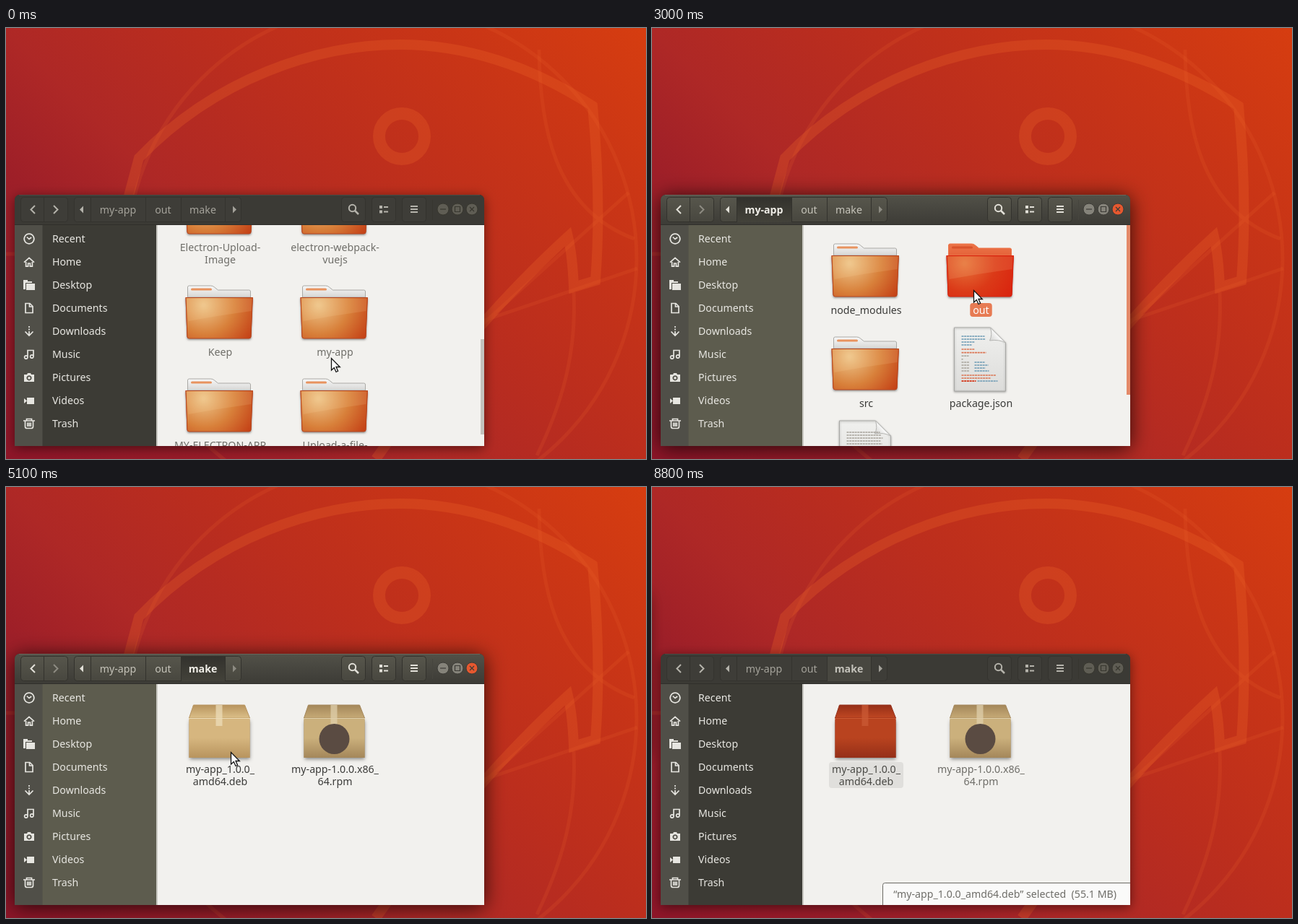
An HTML page with a canvas for the animation above (9.3 s loop, 886 px wide and 597 px high).

```html
<!DOCTYPE html>
<html lang="en">
<head>
<meta charset="utf-8">
<title>File manager</title>
<style>
html, body { margin: 0; height: 100%; overflow: hidden; background: #b02a26 }
canvas { display: block; width: 886px; height: 597px }
</style>
</head>
<body>
<canvas id="stage" width="886" height="597"></canvas>
<script>
const c = document.getElementById('stage').getContext('2d');
const LOOP = 9300, FONT = '14.2px "Noto Sans", "Open Sans", sans-serif';

// ---------- timeline ----------
const within = (t, a, b) => t >= a && t < b;
const DIR_START = [0, 1700, 3200, 4700];
const HOVER = [[200, 1700, 'my-app'], [1700, 2100, 'package.json'], [2200, 3200, 'out'],
  [3300, 3700, 'my-app-linux-x64'], [4100, 4700, 'make'], [6100, 7600, 'deb']];
const SELECT = [[1400, 1700, 'my-app'], [3000, 3200, 'out'], [4400, 4700, 'make'], [6200, LOOP, 'deb']];
const STATUS = [[1600, 1700, '“my-app” selected  (containing 5 items)'],
  [3100, 3200, '“out” selected  (containing 2 items)'],
  [4500, 4700, '“make” selected  (containing 2 items)'],
  [6500, LOOP, '“my-app_1.0.0_amd64.deb” selected  (55.1 MB)']];
const PATH = [[0, 450, 457], [500, 487, 445], [600, 487, 445], [800, 457, 403], [900, 468, 420],
  [2000, 468, 420], [2100, 463, 402], [2200, 478, 411], [2300, 478, 411], [2400, 449, 365],
  [2500, 449, 365], [2700, 445, 363], [3600, 445, 363], [3700, 410, 378], [3800, 410, 378],
  [4200, 298, 363], [5000, 298, 363], [5700, 392, 393], [6000, 392, 393], [6100, 309, 372],
  [7500, 309, 372], [7900, 323, 134], [8000, 323, 134], [8200, 245, 65], [8300, 221, 92],
  [8400, 221, 92], [8800, 60, -30], [LOOP, 60, -30]];
const active = (list, t) => (list.find(e => within(t, e[0], e[1])) || [])[2];

function pointer(t) {
  const i = PATH.findIndex(p => p[0] > t), [t0, x0, y0] = PATH[i - 1], [t1, x1, y1] = PATH[i];
  const k = (t - t0) / (t1 - t0);
  return [Math.round(x0 + (x1 - x0) * k), Math.round(y0 + (y1 - y0) * k)];
}

// ---------- helpers ----------
function fade(x0, y0, x1, y1, ...stops) {
  const g = c.createLinearGradient(x0, y0, x1, y1);
  stops.forEach((s, i) => Array.isArray(s) ? g.addColorStop(s[0], s[1]) : g.addColorStop(i / (stops.length - 1), s));
  return g;
}
function rect(x, y, w, h, fill) { c.fillStyle = fill; c.fillRect(x, y, w, h); }
function box(x, y, w, h, r, fill, line) {
  c.beginPath();
  c.roundRect(x, y, w, h, r);
  if (fill) { c.fillStyle = fill; c.fill(); }
  if (line) { c.strokeStyle = line; c.lineWidth = 1; c.stroke(); }
}
function disc(x, y, r, fill, line, width = 1) {
  c.beginPath();
  c.arc(x, y, r, 0, 7);
  if (fill) { c.fillStyle = fill; c.fill(); }
  if (line) { c.strokeStyle = line; c.lineWidth = width; c.stroke(); }
}
function shape(d, fill, line, width = 1) {
  const p = new Path2D(d);
  if (fill) { c.fillStyle = fill; c.fill(p, 'evenodd'); }
  if (line) { c.strokeStyle = line; c.lineWidth = width; c.stroke(p); }
}
function text(s, x, y, color, align = 'left', bold = '') {
  c.font = bold + FONT;
  c.textAlign = align;
  c.fillStyle = color;
  c.fillText(s, x, y + 5);
}
function at(x, y, draw) { c.save(); c.translate(x, y); draw(); c.restore(); }

// ---------- desktop ----------
function wallpaper() {
  rect(0, 0, 886, 597, fade(0, 597, 741.5, -144.5, [0, '#8d1528'], [.27, '#9e1f28'], [.4, '#ae2826'],
    [.6, '#bc2e1d'], [.81, '#c93516'], [1, '#d63d10']));
  const thin = 'rgba(235,100,45,.16)', thick = 'rgba(235,100,40,.28)';
  disc(520, 320, 353, null, thin, 5);
  shape('M738 30C739 130 756 250 870 292M660 410L862 228M662 405L874 333M786 366C790 450 770 520 735 592M0 313H14',
    null, thin, 5);
  disc(548, 150, 31.5, null, thick, 17);
  shape('M160 270L184 180C290 70 430 23 545 23C640 23 730 55 812 108C820 190 822 270 816 350L786 359C785 335 783 310 778 289C700 360 600 470 512 597',
    null, thick, 14);
}

// ---------- item icons ----------
const FOLDER = {
  normal: ['#ecc287', '#d8803a', '#c23a12', '#fafafa', '#d4d4d2', '#e8935f'],
  hover: ['#fff0ae', '#f8a860', '#e0462a', '#ffffff', '#fafafa', '#f6c08c'],
  both: ['#e57038', '#db3a18', '#d9210d', '#ec7448', '#e4633a', '#d9532c'],
};
const BOX = {
  normal: ['#dbbf88', '#d6b67f', '#b8945e', '#ecdcb8'],
  hover: ['#fce4a6', '#fadfa8', '#e9c78e', '#fff4d2'],
  both: ['#e05a2b', '#e25b2c', '#d34e22', '#e8754a'],
  selected: ['#c04722', '#b9431f', '#952f18', '#cb5a34'],
  rpm: ['#c6aa76', '#cbb07c', '#a4875a', '#dfcfab'],
};
// Icons are drawn around x = 0 with y = 0 at the folder's top edge.
function folder(state) {
  const [a, b, d, back, edge, strip] = FOLDER[state] || FOLDER.both;
  c.save();
  c.shadowColor = 'rgba(0,0,0,.4)'; c.shadowBlur = 3; c.shadowOffsetY = 2;
  shape('M-47 17H46L44 71Q44 74 41 74H-42Q-45 74-45 71Z', d);
  c.restore();
  shape('M-44 17V3Q-44 1-42 1H-12Q-9 1-7 3L-2 7H41Q43 7 43 9V17Z', fade(0, 0, 0, 18, back, edge),
    state == 'normal' ? '#aaa9a5' : back);
  c.lineCap = 'round';
  shape('M-38 6H-12', null, strip, 3);
  c.lineCap = 'butt';
  const g = c.createRadialGradient(-22, 28, 2, -18, 26, 80);
  [a, b, d].forEach((s, i) => g.addColorStop([0, .5, 1][i], s));
  shape('M-46.5 17.5H46L43.5 71Q43.5 74 41 74H-42Q-44.5 74-44.5 71Z', g, state == 'normal' ? '#b8471f' : d);
  shape('M-45 18.5H45L44 36Q0 42-43 50Z', 'rgba(255,225,170,.13)');
}
function carton(state) {
  const [top, front, low, tape] = BOX[state];
  c.save();
  c.shadowColor = 'rgba(0,0,0,.45)'; c.shadowBlur = 5; c.shadowOffsetY = 2;
  rect(-42, 24, 84, 53, low);
  c.restore();
  shape('M-36 4H35L42 22H-42Z', fade(0, 4, 0, 22, low, top), low);
  rect(-42, 22, 84, 55, fade(0, 22, 0, 77, front, front, low));
  rect(-42, 22, 84, 1, tape);
  c.globalAlpha = .75;
  rect(-5, 4, 9, 29, tape);
  c.globalAlpha = 1;
  if (state == 'rpm') disc(0, 51, 21, '#5a4b42');
}
function page(state, json) {
  c.save();
  c.shadowColor = 'rgba(0,0,0,.3)'; c.shadowBlur = 3; c.shadowOffsetY = 1;
  const paper = state == 'hover' ? ['#ffffff', '#f6f6f5'] : ['#f0f0ee', '#dcdcda'];
  shape('M-36-12H14L35 9V76H-36Z', fade(0, -12, 0, 76, ...paper), '#a9a9a6');
  c.restore();
  shape('M14-12Q17-2 13 6Q26 4 35 9Z', fade(14, 8, 26, -2, '#d0d0ce', '#ffffff'), '#b5b5b2');
  c.setLineDash([3, .7]);
  const blue = '#6c9ab4', red = '#dc7553', grey = '#a8a49c';
  if (json) {
    [32, 33, 18, 14].forEach((w, i) => shape(`M-26 ${i * 4}h${w}`, null, blue, 1.6));
    [18, 34, 10, 2].forEach((w, i) => shape(`M-26 ${18 + i * 4.6}h${w}`, null, i < 2 ? red : grey, 1.6));
    for (let i = 0; i < 4; i++) {
      shape(`M-26 ${36 + i * 4}h11`, null, grey, 1.6);
      shape(`M-8 ${36 + i * 4}h${14 + i * 5 % 9}`, null, blue, 1.6);
    }
    shape('M-26 54h48M-26 58h40', null, red, 1.6);
    shape('M-26 62h20', null, '#d4472c', 1.8);
    shape('M-4 62h28', null, blue, 1.6);
  } else {
    for (let i = 0; i < 14; i++) shape(`M-26 ${4 + i * 4}h${46 + i * 7 % 5}`, null, grey, 1.3);
  }
  c.setLineDash([]);
}

// ---------- folder contents: [key, kind, column, top, label lines] ----------
const DIRS = [
  [['up', 'folder', 0, 211, 'Electron-Upload-', 'Image'], ['vue', 'folder', 1, 211, 'electron-webpack-', 'vuejs'],
   ['Keep', 'folder', 0, 356, 'Keep'], ['my-app', 'folder', 1, 356, 'my-app'],
   ['caps', 'folder', 0, 485, 'MY-ELECTRON-APP'], ['file', 'folder', 1, 485, 'Upload-a-file-']],
  [['nm', 'folder', 0, 298, 'node_modules'], ['out', 'folder', 1, 298, 'out'], ['src', 'folder', 0, 427, 'src'],
   ['package.json', 'json', 1, 427, 'package.json'], ['lock', 'page', 0, 556, 'package-lock.json']],
  [['make', 'folder', 0, 298, 'make'], ['my-app-linux-x64', 'folder', 1, 298, 'my-app-linux-x64']],
  [['deb', 'carton', 0, 298, 'my-app_1.0.0_', 'amd64.deb'], ['rpm', 'carton', 1, 298, 'my-app-1.0.0.x86_', '64.rpm']],
];
function item([key, kind, col, top, ...lines], t, focus) {
  const x = 296 + col * 159, hover = active(HOVER, t) == key, sel = active(SELECT, t) == key;
  const state = sel ? (hover ? 'both' : 'selected') : hover ? 'hover' : 'normal';
  at(x - .5, top, () => {
    if (kind == 'folder') folder(state);
    else if (kind == 'carton') carton(key == 'rpm' ? 'rpm' : state);
    else page(state, kind == 'json');
  });
  if (sel) {
    c.font = FONT;
    const w = Math.max(...lines.map(s => c.measureText(s).width)) + 8;
    box(x + .5 - w / 2, top + 83, w, 2 + lines.length * 17, 4, focus ? '#e77b53' : '#e0dfdc');
  }
  const color = sel ? (focus ? '#fff' : '#4a4a46') : focus ? '#3b3b39' : '#6f6e69';
  lines.forEach((s, i) => text(s, x + .5, top + 93 + i * 17, color, 'center'));
}

// ---------- window ----------
const PLACES = [
  ['Recent', '', 'M8 1.2a6.8 6.8 0 1 0 .01 0M4.8 5.5L8 8.5l3.2-2.5'],
  ['Home', '', 'M1 8.7L8 2.4l7 6.3M3.6 8v6.2h3V10h2.8v4.2h3V8'],
  ['Desktop', 'M0 1h6v2h6v2H3v9H0zM4 6h12v9H4z', ''],
  ['Documents', '', 'M3 1.5h6l4 4V14.500H3zM8.500 1.500v4.500H13'],
  ['Downloads', '', 'M8 1v2M8 4.500v2M8 8v5M2.500 8.500L8 14l5.500-5.500'],
  ['Music', '', 'M6 12V2.500h8V11M6 12a2.200 2.200 0 1 1-4.400 0a2.200 2.200 0 1 1 4.400 0M14 11a2.200 2.200 0 1 1-4.400 0a2.200 2.200 0 1 1 4.400 0'],
  ['Pictures', 'M1 4h4l1-2h4l1 2h4v10H1zM8 5.200a3.600 3.600 0 1 0 .01 0zM8 7a1.800 1.800 0 1 0 .01 0z', ''],
  ['Videos', 'M5 4h10v9H5zM1 5l4 3.500-4 3.500z', ''],
  ['Trash', '', 'M0 4h16M4.500 4V1.500h7V4M2.500 4v8q0 2.500 2.500 2.500h6q2.500 0 2.500-2.500V4M5.800 6.500v5.500M8 6.500v5.500M10.200 6.500v5.500'],
];
function sidebar(focus) {
  rect(12, 273, 196, 306, focus ? '#5d5c4e' : '#3c3b35');
  rect(12, 273, 38, 306, '#504f48');
  rect(50, 273, 1, 306, focus ? '#55544a' : '#45443e');
  rect(208, 273, 2, 306, '#c9c8c2');
  PLACES.forEach(([name, solid, lines], i) => {
    const y = 292 + 32 * i;
    at(24, y - 8, () => shape(solid, '#e6e5e0'));
    at(24, y - 8, () => shape(lines, null, '#e6e5e0', 1.7));
    text(name, 64, y, '#e8e7e2');
  });
}
function toolbar(dir, focus) {
  const ink = focus ? '#e2e0d8' : '#b5b3ab', dim = focus ? '#8d8b82' : '#a3a199';
  const edge = focus ? '#33322d' : '#34332e';
  const face = focus ? fade(0, 234, 0, 269, '#57564c', '#48473f') : '#3e3d38';
  box(12, 231, 650, 42, [7, 7, 0, 0], focus ? fade(0, 231, 0, 273, '#525148', '#3c3b36') : '#3b3a35');
  shape('M18 231.500H656', null, focus ? '#67665b' : '#4b4a44');
  rect(12, 272, 650, 1, '#302f2b');
  for (const [x, w] of [[20, 66], [94, 232], [464, 34], [506, 34], [548, 34]])
    box(x + .5, 234.5, w - 1, 34, 4, face, edge);
  if (dir) {
    const x = [0, 117, 193, 242][dir], w = [0, 76, 49, 61][dir];
    rect(x, 235, w, 34, focus ? fade(0, 235, 0, 269, '#33322d', '#43423a') : '#484740');
  }
  for (const x of [52, 117, 193, 242, 303]) rect(x, 235, 1, 34, edge);
  shape('M40 246l-5.500 5.500 5.500 5.500', null, ink, 2);
  shape('M66 246l5.500 5.500-5.500 5.500', null, focus && dir ? dim : ink, 2);
  shape('M107 246.500v10l-5-5z', ink);
  shape('M314 246.500v10l5-5z', dim);
  [['my-app', 155], ['out', 217.5], ['make', 272.5]].forEach(([s, x], i) => {
    const on = dir == i + 1;
    text(s, x, 252, on ? (focus ? '#f0eee8' : '#c4c2ba') : focus ? '#c6c4ba' : '#a5a39b', 'center', on ? 'bold ' : '');
  });
  disc(479.500, 249.500, 4.700, null, ink, 2);
  shape('M483 253l5 5', null, ink, 2.500);
  for (const y of [246, 252.5]) { rect(517, y, 4, 4, ink); rect(523, y + 1, 6, 2, ink); }
  for (const y of [246, 250, 254]) rect(560, y, 10, 2, ink);
  rect(590, 238, 1, 28, focus ? '#46453e' : '#373630');
  const mark = focus ? '#3c3b36' : '#38372f';
  [605, 625, 645].forEach((x, i) => {
    disc(x, 251, 8, focus ? (i == 2 ? '#e5582f' : '#85837a') : '#5f5d54', mark);
    at(x, 251, () => shape(['M-4 0H4', 'M-3.500-3.500h7v7h-7z', 'M-3-3L3 3M3-3L-3 3'][i], null, mark, 1.2));
  });
}
function windowFrame(t) {
  const focus = within(t, 1400, 7400), deep = within(t, 1400, 7600);
  const dir = DIR_START.filter(s => s <= t).length - 1;
  c.save();
  c.shadowColor = `rgba(0,0,0,${deep ? .75 : .5})`;
  c.shadowBlur = deep ? 28 : 16;
  c.shadowOffsetY = 3;
  box(12, 231, 650, 348, [7, 7, 0, 0], '#3b3a35');
  c.restore();
  toolbar(dir, focus);
  sidebar(focus);
  c.save();
  c.beginPath();
  c.rect(210, 273, 452, 306);
  c.clip();
  rect(210, 273, 452, 306, '#f2f1ee');
  DIRS[dir].forEach(e => item(e, t, focus));
  if (dir == 0) {
    c.globalAlpha = Math.max(0, Math.min(1, (500 - t) / 400));
    rect(657, 431, 5, 132, '#c3c2be');
    c.globalAlpha = 1;
  }
  if (dir == 1) rect(657, 273, 5, 235, '#e48a69');
  const note = active(STATUS, t);
  if (note) {
    c.font = FONT;
    const x = Math.round(643 - c.measureText(note).width - 15);
    box(x + .5, 548.5, 680 - x, 50, 3, '#fafaf9', focus ? '#b5b3ad' : '#6b6a64');
    text(note, 643, 564, focus ? '#3b3b39' : '#6f6e69', 'right');
  }
  c.restore();
}

function cursor(t) {
  at(...pointer(t), () => {
    if (within(t, 7400, 7700)) {
      disc(0, 0, 8.500, '#fff', '#222', 1.500);
      for (let i = 0; i < 8; i++) {
        c.save();
        c.rotate(i * Math.PI / 4 + t / 400);
        shape('M0-3.500V-6', null, `rgba(40,40,40,${.15 + i * .1})`, 1.500);
        c.restore();
      }
    } else {
      shape('M.5 .5V17L4.300 13.500L7 19.500L9.600 18.300L7 12.500H12.300Z', '#fff', '#111', 1.300);
    }
  });
}

// Shadow of a second window that opens beyond the left edge
function sideShadow() {
  c.save();
  c.shadowColor = 'rgba(0,0,0,.6)';
  c.shadowBlur = 22;
  rect(-200, 150, 193, 220, '#000');
  c.restore();
}

let last = -1;
function frame(now) {
  const t = Math.floor(now % LOOP / 100) * 100;
  if (t != last) {
    last = t;
    wallpaper();
    if (t >= 7800) sideShadow();
    windowFrame(t);
    cursor(t);
  }
  requestAnimationFrame(frame);
}
const start = performance.now();
requestAnimationFrame(function tick() {
  frame = (f => () => f(performance.now() - start))(frame);
  frame();
});
</script>
</body>
</html>
```
